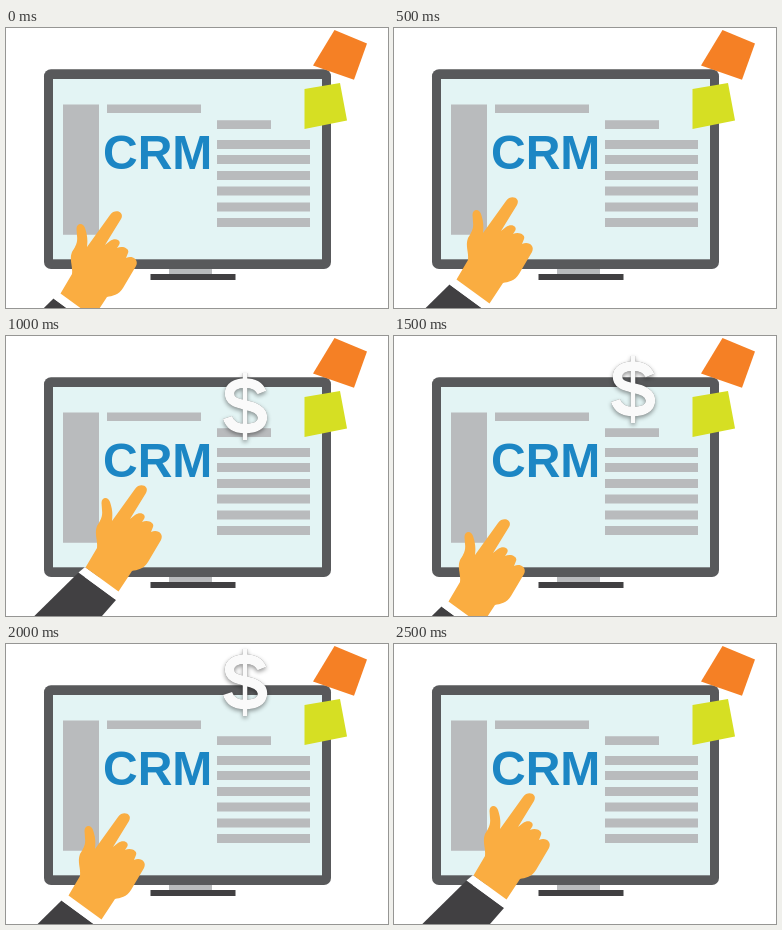
Recreate the animation shown at these times as an HTML page. Size 382 by 280 pixels, loop 3 s.

```html
<!DOCTYPE html>
<html lang="en">
<head>
<meta charset="utf-8">
<title>CRM</title>
<style>
  html, body { margin: 0; width: 100%; height: 100%; overflow: hidden; background: #fff; }
  svg { display: block; }
  text { font-family: "Liberation Sans", Arial, sans-serif; font-weight: bold; }
  #dollar { filter: drop-shadow(0 0 .7px rgba(0, 0, 0, .45)) drop-shadow(0 2px 2px rgba(0, 0, 0, .4)); }
</style>
</head>
<body>
<svg width="382" height="280" viewBox="0 0 382 280">
  <rect x="38" y="41.300" width="287" height="199.700" rx="7" fill="#58595b"/>
  <rect x="47" y="51" width="269" height="180.300" fill="#e3f4f4"/>
  <rect x="163" y="241" width="43" height="5" fill="#b9bbbd"/>
  <rect x="144.500" y="246" width="85" height="6" fill="#414042"/>
  <path fill="#b9bbbd" d="M57 76.500h36v130.200h-36zM101 76.500h94v8.500h-94zM211 92.200h54v8.800h-54z"/>
  <path d="M211 116.500h93m-93 15h93m-93 16h93m-93 15.500h93m-93 16h93m-93 15.500h93" stroke="#b9bbbd" stroke-width="9"/>
  <path fill="#f58025" d="M328.500 2L361 15.500 348 51.700 307 37.500z"/>
  <path fill="#d6df23" d="M298.500 61L334 55 341 92.500 298.500 101z"/>
  <text x="97" y="141.300" font-size="48" fill="#1c86c4">CRM</text>
  <g id="dollar" fill="none" stroke="#fafafa">
    <path stroke-width="9.500" d="M256 56.500C253 49.500 247 47 239 47C230 47 223.500 51 223.500 57.500C223.500 65 230 67 239 69C249 71 256.500 74 256.500 81.500C256.500 89 249 92.500 239 92.500C230 92.500 224 89.500 221.500 81.500"/>
    <path stroke-width="4.500" d="M239 37V104"/>
  </g>
  <g id="hand">
    <path fill="#414042" d="M72.500 236.500L110 264 75 304 4 304z"/>
    <path fill="#fff" d="M72.500 236.500L79 231 113.500 255.500 109.500 263.500z"/>
    <path fill="#faad41" d="M79.500 231.500L91 212C92 204 88 198 91 190C94 185 97 181 96 174L95.500 167C95.500 161 102 160 104 166C106 172 107 177 106 185L129 153C134 146 144 150 140 157L124 183L129 179C134 175 141 178 138 183L136 186C142 183 149 187 147 191L145 196C152 193 158 198 155 204L142 226C138 233 131 234 126 235L112.500 255.500z"/>
  </g>
</svg>
<script>
  const hand = document.getElementById('hand');
  const dollar = document.getElementById('dollar');
  const STEP = 500;
  const REACH = [[-25, 34], [-17, 20], [0, 0]];
  const RISE = { 2: 0, 3: -17, 4: -32 };

  function draw(now) {
    const step = Math.floor(now / STEP) % 6;
    hand.setAttribute('transform', `translate(${REACH[step % 3]})`);
    dollar.setAttribute('visibility', step in RISE ? 'visible' : 'hidden');
    dollar.setAttribute('transform', `translate(0 ${RISE[step] ?? 0})`);
    requestAnimationFrame(draw);
  }
  draw(0);
</script>
</body>
</html>
```
